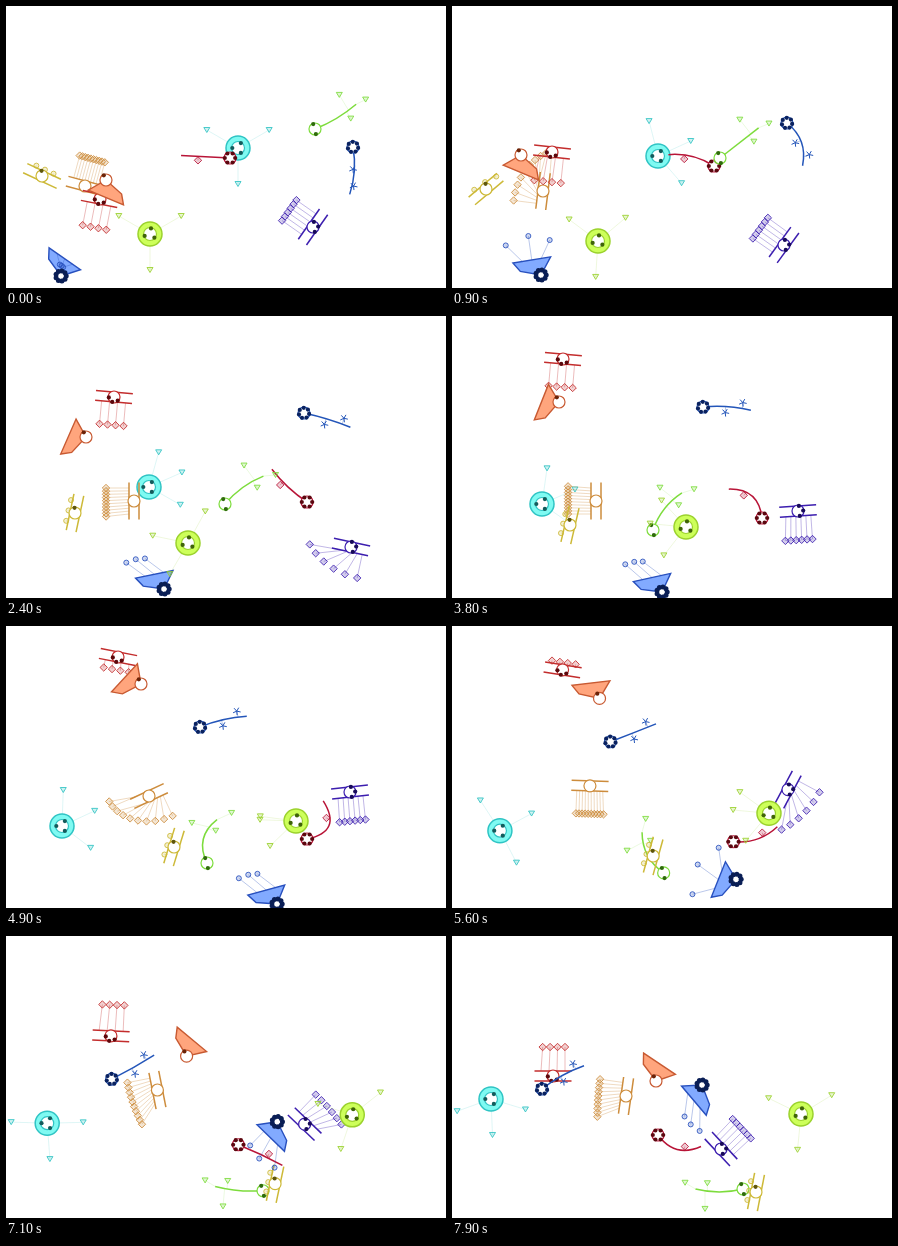
An HTML page with a canvas for the animation above (8000 ms loop, 440x282 px).

```html
<!DOCTYPE html>
<html lang="en">
<head>
<meta charset="utf-8">
<title>Swimming creatures</title>
<style>
html, body { margin: 0; width: 100%; height: 100%; overflow: hidden; background: #fff; }
canvas { display: block; }
</style>
</head>
<body>
<canvas id="stage" width="440" height="282"></canvas>
<script>
const ctx = document.getElementById('stage').getContext('2d');
const RAD = Math.PI / 180;
const TIMES = [0, 7, 22, 36, 46, 61, 76];
const LAG = 10; // how many steps the feet trail behind
const creatures = [];
const add = (kind, look, ...keys) => creatures.push({ kind, ...look, keys });

// Key points: x, y, then angle, then the reach of the legs (bars) or the bend (tail).
add('disc', { line: '#2fc4c4', fill: '#7ffaf2', dark: '#145c5c', foot: 'tri', dots: [3, 180, 120] },
  [232, 142], [206, 150], [143, 171], [90, 188], [56, 200], [44, 203], [39, 163]);

add('bars', { line: '#cd8c3c', dark: '#6b3f0c', foot: 'diamond', dots: [0, 0, 0], legs: 10, reach: 28, spread: 26 },
  [79, 180, 195], [91, 185, 97], [128, 185, 90], [144, 185, 90],
  [143, 170, -25], [137, 152, 57], [174, 160, 98]);

add('bars', { line: '#c32d2d', dark: '#5c080c', foot: 'diamond', dots: [3, 45, 65], legs: 4, spread: 24 },
  [94, 193, 11, 29], [100, 146, 6, 30], [108, 81, 5, 28], [111, 43, 5, 28],
  [112, 31, 11, 13], [108, 69, 5, -28], [101, 140, 0, -29]);

add('tail', { line: '#b81437', dark: '#5c0810', foot: 'diamond', dots: [6, 0, 60], perches: [[0.65, -4]] },
  [224, 152, 183, 0], [262, 160, 194, 4], [301, 186, 223, -2], [310, 202, 221, 10],
  [301, 213, 293, 15], [255, 215, 382, -5], [206, 199, 375, 9]);

add('tail', { line: '#7ddc3c', dark: '#2f6b0c', foot: 'tri', dots: [2, 80, 170], perches: [[0.8, -18], [1.22, 3], [0.75, 8]] },
  [309, 123, -31, 2], [268, 152, -38, 0], [219, 188, -36, -3], [201, 214, -52, -4],
  [201, 237, -77, -9], [231, 254, -162, -2], [291, 253, -180, -3]);

add('bars', { line: '#cdb937', dark: '#5f560c', foot: 'ring', dots: [1, -95, 0], legs: 3, reach: 7, spread: 19 },
  [36, 170, 205], [34, 183, 140], [69, 197, 102], [118, 209, 103],
  [168, 221, 107], [238, 240, 103], [304, 256, 101]);

add('bars', { line: '#3c1eaf', dark: '#180a5a', foot: 'diamond', dots: [3, -80, 75], legs: 6, reach: 29, spread: 25 },
  [307, 221, 125], [332, 239, 126], [345, 231, 12], [346, 195, -4],
  [344, 166, -6], [321, 171, -125], [269, 213, -133]);

add('wedge', { line: '#c85a32', fill: '#ffa57d', dark: '#6b2308', dots: [1, -115, 0], legs: 0 },
  [100, 174, 55], [69, 149, 55], [80, 121, 146], [107, 86, 144],
  [135, 58, 165], [162, 99, 247], [204, 145, 246]);

add('tail', { line: '#2355b9', dark: '#0a2260', foot: 'star', dots: [7, 10, 360 / 7], perches: [[0.47, 6], [0.82, -6]] },
  [347, 141, 94, -3], [335, 117, 70, -7], [298, 97, 17, -1], [251, 91, 4, -2],
  [194, 101, -13, -2], [124, 133, -28, 2], [90, 153, -29, -2]);

add('wedge', { line: '#2850be', fill: '#82aaff', dark: '#0a1e55', foot: 'ring', dots: [9, 0, 40], legs: 3 },
  [55, 270, 247], [89, 269, 203], [158, 273, 201], [210, 276, 200],
  [271, 278, 197], [284, 217, 85], [250, 149, 82]);

add('disc', { line: '#9bd22d', fill: '#cdff5a', dark: '#3f6408', foot: 'tri', dots: [3, -80, 120] },
  [144, 228], [146, 235], [182, 227], [234, 211], [290, 195], [339, 181], [349, 178]);

// Smooth curve through the keys, with uneven spacing in time.
function pose(keys, n) {
  const last = TIMES.length - 1;
  let k = 0;
  while (k < last - 1 && n >= TIMES[k + 1]) k++;
  const span = TIMES[k + 1] - TIMES[k], u = (n - TIMES[k]) / span;
  const slope = (i, j) => {
    const a = Math.max(0, i - 1), b = Math.min(last, i + 1);
    return (keys[b][j] - keys[a][j]) / (TIMES[b] - TIMES[a]) * span;
  };
  return keys[k].map((p, j) => {
    const d = keys[k + 1][j] - p, m = slope(k, j), e = slope(k + 1, j);
    return p + u * (m + u * (3 * d - 2 * m - e + u * (m + e - 2 * d)));
  });
}

const mix = (a, b, t) => [a[0] + (b[0] - a[0]) * t, a[1] + (b[1] - a[1]) * t];
const polar = ([x, y], deg, r) => [x + r * Math.cos(deg * RAD), y + r * Math.sin(deg * RAD)];
const times = (count, make) => Array.from({ length: count }, (_, i) => make(i));

function path(points, closed) {
  ctx.beginPath();
  points.forEach(p => ctx.lineTo(...p));
  if (closed) ctx.closePath();
}

function circle([x, y], r) {
  ctx.beginPath();
  ctx.arc(x, y, r, 0, 7);
}

function drawFoot(kind, at, color) {
  const [x, y] = at;
  ctx.lineWidth = 1;
  if (kind === 'star') {
    for (let i = 0; i < 5; i++) {
      path([at, polar(at, i * 72 - 60, 4)]);
      ctx.stroke();
    }
    return;
  }
  if (kind === 'ring') circle(at, 2.5);
  if (kind === 'tri') path([[x - 3, y - 2.5], [x + 3, y - 2.5], [x, y + 2.5]], true);
  if (kind === 'diamond') path([[x - 3.7, y], [x, y - 3.7], [x + 3.7, y], [x, y + 3.7]], true);
  ctx.fillStyle = color;
  ctx.globalAlpha = 0.22;
  ctx.fill();
  ctx.globalAlpha = 0.85;
  ctx.stroke();
  ctx.globalAlpha = 1;
}

function drawHead(at, { line, dark, dots: [count, phase, step] }, r) {
  ctx.lineWidth = 1.2;
  ctx.fillStyle = '#fff';
  circle(at, r);
  ctx.fill();
  ctx.strokeStyle = line;
  ctx.stroke();
  ctx.fillStyle = dark;
  for (let i = 0; i < count; i++) {
    circle(polar(at, phase + i * step, r - 0.8), count > 8 ? 2.5 : 2.1);
    ctx.fill();
  }
}

// In a turn the legs on the trailing side still point the old way.
function trail(turn, i, legs) {
  const t = i / (legs - 1);
  return turn * (turn > 0 ? 1 - t : t);
}

// Each body draws itself and returns its legs as [start, foot] pairs.
const bodies = {
  disc(c, at, [], past) {
    ctx.lineWidth = 1.5;
    ctx.fillStyle = c.fill;
    circle(at, 12);
    ctx.fill();
    ctx.stroke();
    return times(3, i => {
      const [x, y] = polar(past, 90 + i * 120, 38);
      const dir = Math.atan2(y - at[1], x - at[0]) / RAD;
      return [polar(at, dir, 12), polar(at, dir, 36)];
    });
  },
  bars(c, at, [angle, reach = c.reach], past) {
    const spot = (u, v) => polar(polar(at, angle, u), angle + 90, v);
    ctx.lineWidth = 1.5;
    for (const v of [-5, 5]) {
      path([spot(-18.5, v), spot(18.5, v)]);
      ctx.stroke();
    }
    return times(c.legs, i => {
      const u = c.spread * (i / (c.legs - 1) - 0.5);
      const swing = trail(past[2] - angle, i, c.legs);
      const foot = polar(spot(u, 0), angle + 90 + swing, reach);
      return [spot(u, 5 * Math.sign(reach * Math.cos(swing * RAD))), foot];
    });
  },
  tail(c, at, [angle, bend], past, wake) {
    const chord = 49 - Math.abs(bend) / 2;
    const tip = polar(at, angle, chord);
    const bow = polar(mix(at, tip, 0.5), angle + 90, 2 * bend);
    ctx.lineWidth = 1.5;
    ctx.beginPath();
    ctx.moveTo(...at);
    ctx.quadraticCurveTo(...bow, ...tip);
    ctx.stroke();
    return c.perches.map(([t, side]) => {
      const point = s => mix(mix(at, bow, s), mix(bow, tip, s), s);
      const away = c.foot === 'star' ? side * wake : side;
      return [point(Math.min(1, t)), polar(point(t), angle + 90, away)];
    });
  },
  wedge(c, at, [angle], past, wake) {
    const far = polar(at, angle, 30.5), near = polar(at, angle + 95, 20.5);
    path([at, near, far, polar(at, angle - 13, 21)], true);
    ctx.lineWidth = 1.4;
    ctx.fillStyle = c.fill;
    ctx.fill();
    ctx.stroke();
    return times(c.legs, i => {
      const dir = angle + 37 - 10 * i + trail(past[2] - angle, i, c.legs);
      return [mix(near, far, (i + 1) / (c.legs + 1)), polar(at, dir, (36 + 5 * i) * wake)];
    });
  }
};

function drawCreature(c, n) {
  const [x, y, ...shape] = pose(c.keys, n);
  const past = pose(c.keys, Math.max(0, n - LAG));
  const wake = Math.min(1, 0.25 + n / 8);
  ctx.strokeStyle = c.line;
  for (const [start, foot] of bodies[c.kind](c, [x, y], shape, past, wake)) {
    ctx.lineWidth = 0.8;
    ctx.globalAlpha = c.foot === 'tri' ? 0.2 : 0.4;
    path([start, foot]);
    ctx.stroke();
    ctx.globalAlpha = 1;
    drawFoot(c.foot, foot, c.line);
  }
  drawHead([x, y], c, c.kind === 'disc' ? 6.5 : 6);
}

function frame(now) {
  // Ten steps a second, with a short hold at the start and at 4.1 s.
  const tick = Math.floor(now % 8000 / 100);
  const n = Math.max(0, tick - 2) - (tick > 40 ? 1 : 0);
  ctx.fillStyle = '#fff';
  ctx.fillRect(0, 0, 440, 282);
  creatures.forEach(c => drawCreature(c, n));
  requestAnimationFrame(frame);
}
requestAnimationFrame(frame);
</script>
</body>
</html>
```
